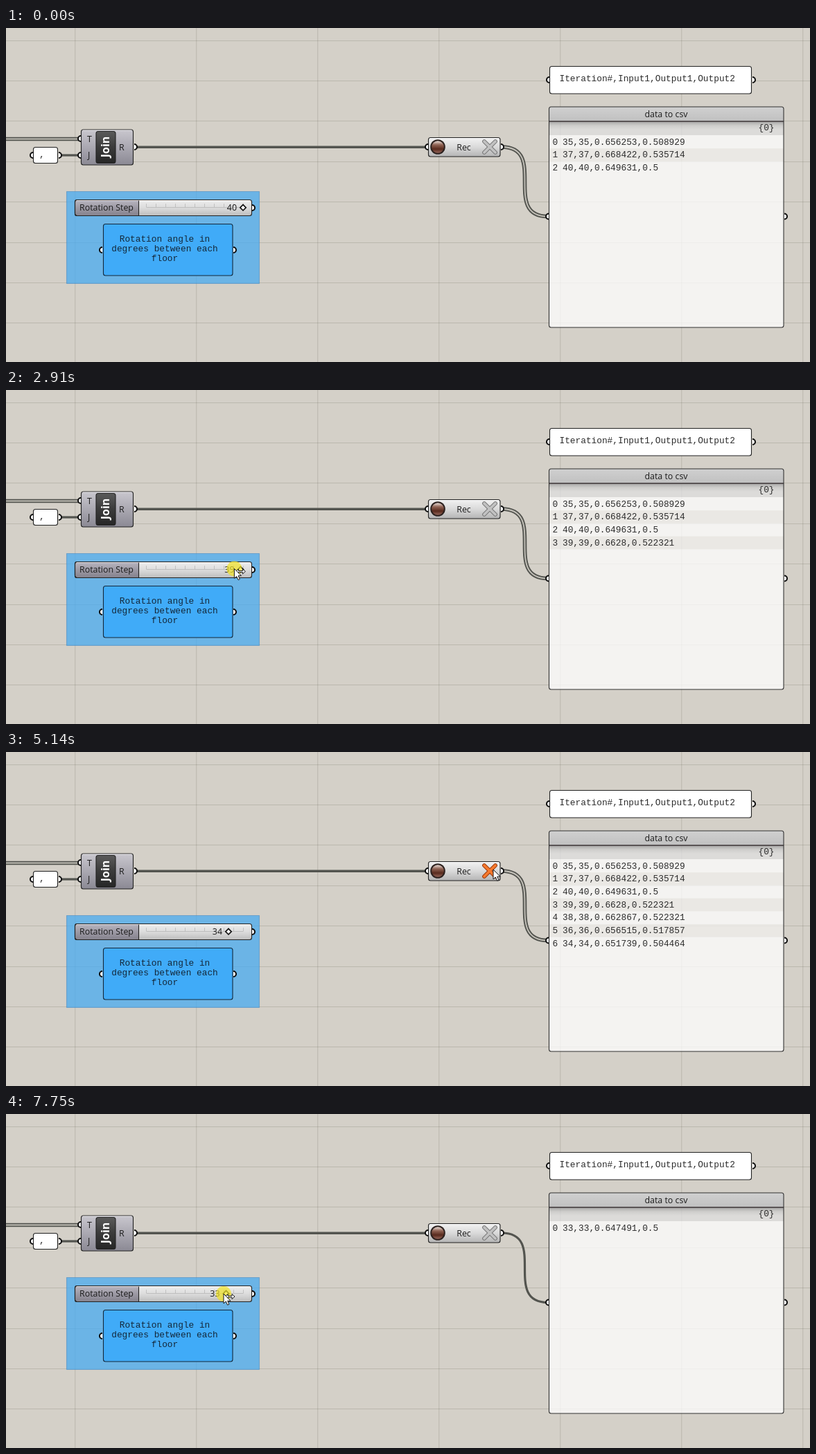
These frames come from a looping animation (1160 by 483 pixels, 8000 ms). An HTML page with a canvas:

```html
<!DOCTYPE html>
<html lang="en">
<head>
<meta charset="utf-8">
<title>Data recorder</title>
<style>
html, body { margin: 0; width: 100%; height: 100%; overflow: hidden; background: #d4d0c8; }
canvas { display: block; width: 1160px; height: 483px; }
</style>
</head>
<body>
<canvas id="stage" width="1160" height="483"></canvas>
<script>
const ctx = document.getElementById('stage').getContext('2d');
const LOOP = 8000;
const CLEAR = 5760;
const UI = '"Open Sans", "Noto Sans", sans-serif';
const MONO = '"Liberation Mono", "Courier New", monospace';
const INK = '#222', WIRE = '#53544f';

// Each line starts with the slider value it was recorded at.
const records = [
  { at: 0, line: '35,35,0.656253,0.508929' },
  { at: 0, line: '37,37,0.668422,0.535714' },
  { at: 0, line: '40,40,0.649631,0.5' },
  { at: 2350, line: '39,39,0.6628,0.522321' },
  { at: 2980, line: '38,38,0.662867,0.522321' },
  { at: 3450, line: '36,36,0.656515,0.517857' },
  { at: 4310, line: '34,34,0.651739,0.504464' },
  { at: 7750, line: '33,33,0.647491,0.5' }
];

const linear = k => k;
const smooth = k => k * k * (3 - 2 * k);
const easeOut = power => k => 1 - (1 - k) ** power;

// The pointer enters, drags the knob, goes to the clear button and returns.
const ENTRY = { x: 375, y: 250 };
const moves = [
  { from: 180, to: 930, x: 341, y: 259, ease: smooth },
  { from: 1950, to: 3650, x: 320.5, y: 258, ease: linear },
  { from: 4310, to: 5100, x: 703, y: 170, ease: smooth },
  { from: 6030, to: 6860, x: 325, y: 260, ease: easeOut(4), easeY: easeOut(1.5) },
  { from: 6930, to: 7600, x: 314, y: 260, ease: linear }
];

function pointerAt(t) {
  if (t < moves[0].from) return null;
  let { x, y } = ENTRY;
  for (const m of moves) {
    const k = Math.min(1, Math.max(0, (t - m.from) / (m.to - m.from)));
    x += (m.x - x) * m.ease(k);
    y += (m.y - y) * (m.easeY || m.ease)(k);
  }
  return { x, y };
}

function stateAt(t) {
  const seen = records.filter(r => r.at <= t);
  return {
    value: parseInt(seen[seen.length - 1].line, 10),
    rows: seen.filter(r => t < CLEAR || r.at > CLEAR).map(r => r.line),
    pressed: (t >= 1350 && t < 4050) || t >= 7400,
    tip: pointerAt(t)
  };
}

function text(s, x, y, font, color, align = 'left') {
  ctx.font = font;
  ctx.fillStyle = color;
  ctx.textAlign = align;
  ctx.fillText(s, x, y);
}
const label = (s, x, y, align) => text(s, x, y, '12.4px ' + UI, '#1a1a1a', align);
const mono = (s, x, y, align, color = '#2c2c2c') => text(s, x, y, '12.8px ' + MONO, color, align);

function shade(y0, y1, ...colors) {
  const g = ctx.createLinearGradient(0, y0, 0, y1);
  colors.forEach((c, i) => g.addColorStop(i / (colors.length - 1), c));
  return g;
}

function rect(x, y, w, h, fill) {
  ctx.fillStyle = fill;
  ctx.fillRect(x, y, w, h);
}

function box(x, y, w, h, fill, stroke = INK, radius = 3) {
  ctx.beginPath();
  ctx.roundRect(x, y, w, h, radius);
  if (fill) { ctx.fillStyle = fill; ctx.fill(); }
  if (stroke) { ctx.strokeStyle = stroke; ctx.lineWidth = 1.1; ctx.stroke(); }
}

function line(x0, y0, x1, y1, color, width = 1) {
  ctx.beginPath();
  ctx.moveTo(x0, y0);
  ctx.lineTo(x1, y1);
  ctx.strokeStyle = color;
  ctx.lineWidth = width;
  ctx.stroke();
}

const gloss = (x, y, w) => line(x + 2, y + 1, x + w - 2, y + 1, 'rgba(255,255,255,0.6)');

function disc(x, y, r, fill) {
  ctx.beginPath();
  ctx.arc(x, y, r, 0, 7);
  ctx.fillStyle = fill;
  ctx.fill();
}

// Half-round sockets on the left and right edges of a node.
function socket(x, y, side) {
  ctx.beginPath();
  ctx.arc(x, y, 4, -Math.PI / 2, Math.PI / 2, side < 0);
  ctx.fillStyle = '#fff';
  ctx.fill();
  ctx.strokeStyle = '#0c0c0c';
  ctx.lineWidth = 2;
  ctx.stroke();
}
function sockets(left, right, y) {
  socket(left, y, -1);
  socket(right, y, 1);
}

function grid() {
  rect(0, 0, 1160, 483, '#d4d0c8');
  const c = 'rgba(60,55,40,0.16)';
  for (let x = 99.75; x < 1160; x += 175) line(x, 0, x, 483, c);
  for (let y = 18; y < 483; y += 58.4) line(0, Math.floor(y) + 0.5, 1160, Math.floor(y) + 0.5, c);
}

function wires(count) {
  line(0, 160.5, 107, 160.5, WIRE, 5.4);
  line(0, 160.5, 107, 160.5, '#c2bfb7', 1.8);
  line(77, 184, 107, 184, WIRE, 3.2);
  line(186, 172.3, 608, 172.3, WIRE, 3.6);
  const curve = (color, width) => {
    ctx.beginPath();
    ctx.moveTo(715, 172);
    ctx.bezierCurveTo(782, 172, 715, 272.5, 782, 272.5);
    ctx.strokeStyle = color;
    ctx.lineWidth = width;
    ctx.stroke();
  };
  curve(count ? WIRE : '#f4683a', count > 1 ? 5.6 : 3.2);
  if (count > 1) curve('#c6c3bb', 1.8);
}

function joinNode() {
  sockets(39, 76, 184);
  box(39.5, 172.5, 35, 23, '#fff');
  mono(',', 48, 187);

  socket(108, 160, -1);
  sockets(108, 185, 184 - 12);
  rect(102, 166.5, 6, 12, '#d4d0c8');
  socket(108, 184, -1);
  box(108.5, 147, 75, 51, shade(147, 198, '#c9c7ce', '#aaa8b1', '#8b8994'));
  gloss(108.5, 147, 75);
  label('T', 117, 164.5);
  label('J', 118, 188);
  label('R', 163, 176.5);
  box(130, 149.5, 28, 46, shade(149, 196, '#5c5c5c', '#3a3a3a', '#262626'));
  ctx.save();
  ctx.translate(149, 172);
  ctx.rotate(-Math.PI / 2);
  text('Join', 0, 0, 'bold 16px ' + UI, '#fff', 'center');
  ctx.restore();
}

function slider(value) {
  box(87.5, 236.5, 278, 133, 'rgba(73,171,240,0.75)', 'rgba(60,130,190,0.5)', 0);

  socket(355, 260, 1);
  box(99.5, 248.5, 255, 23, shade(248, 272, '#efefef', '#dcdcdc', '#bcbcbc'), null);
  box(99.5, 248.5, 92, 23, shade(248, 272, '#bab7c1', '#9d9aa5', '#84818c'), INK, [3, 0, 0, 3]);
  gloss(99.5, 248.5, 255);
  box(99.5, 248.5, 255, 23, null);
  label('Rotation Step', 106, 264);

  const at = v => 202.5 + v * 3.5, tick = 'rgba(110,110,110,0.28)', y = 259.7;
  line(at(0), 259.5, at(40), 259.5, tick);
  for (let v = 0; v <= 40; v += 4) line(at(v), 254, at(v), 259, tick);
  const x = at(value) - 0.5;
  label(String(value), x - 9, 264, 'right');
  ctx.save();
  ctx.translate(x, y);
  ctx.rotate(Math.PI / 4);
  rect(-3.8, -3.8, 7.6, 7.6, '#111');
  rect(-2.1, -2.1, 4.2, 4.2, '#fff');
  ctx.restore();

  sockets(139, 328, 321);
  box(140.5, 283.5, 186.5, 74.5, '#40abf8', '#14283a');
  ['Rotation angle in', 'degrees between each', 'floor'].forEach((s, i) =>
    mono(s, 229, 309.4 + 14 * i, 'center', '#14283a'));
}

function balloon(x, y) {
  box(x, y, 14.5, 10, shade(y, y + 11, '#ffd65c', '#f0a414'), '#b87608', 1);
  ctx.fillStyle = '#d8900e';
  ctx.fill(new Path2D(`M${x + 7} ${y + 10}h5l-3.5 4z`));
}

function cross(x, y, hot) {
  const stroke = (color, width) => [-8, 8].forEach(r => line(x - 8, y - r, x + 8, y + r, color, width));
  ctx.lineCap = 'round';
  stroke(hot ? '#9c3c10' : '#7b7b7b', 5.8);
  stroke(hot ? '#f7792c' : '#c2c2c2', 3.8);
  ctx.lineCap = 'butt';
}

function recorder(empty, hot) {
  sockets(609, 714, 172);
  box(609.5, 158.5, 103.5, 27.5, empty ? shade(158, 186, '#ffb95a', '#ff9a26', '#f08410')
    : shade(158, 186, '#f3f3f3', '#dadada', '#b4b4b4'));
  gloss(609.5, 158.5, 103.5);
  disc(623, 172, 10.8, '#2c211e');
  disc(623, 172, 8.8, empty ? shade(163, 181, '#f0f0f0', '#8a8a8a', '#484645', '#8c8c8c')
    : shade(163, 181, '#efe4df', '#8f6253', '#582a1d', '#96665a'));
  label('Rec', 660.5, 176.5, 'center');
  cross(698, 172, hot);
  if (empty) balloon(696.5, 145.5);
}

function dataPanel(rows) {
  sockets(784, 1077, 75);
  box(784.5, 55.5, 291, 39.5, '#fff');
  mono('Iteration#,Input1,Output1,Output2', 798.5, 77);

  const x = 783.5, w = 338.5, shadow = a => `rgba(60,60,60,${a})`;
  sockets(783, 1123, 272.5);
  box(x, 114, w, 319, 'rgba(255,255,255,0.75)', null);
  if (rows.length) {
    rect(x, 135, w, 20, shadow(0.13));
    mono('{0}', 1085.5, 148);
  } else {
    mono('No data was collected…', 948, 286, 'center', '#adaca9');
  }
  rect(x, 135, w, 12, shade(135, 147, shadow(0.34), shadow(0.09), shadow(0)));
  rows.forEach((s, i) => {
    const y = 168.5 + 18.7 * i;
    if (i % 2) rect(x, y - 13, w, 18.7, 'rgba(110,100,85,0.08)');
    mono(String(i), 788.5, y);
    mono(s, 803, y);
  });

  box(x, 114, w, 21, shade(114, 135, '#d0d0d0', '#c0c0c0'), null, [3, 3, 0, 0]);
  line(x, 135, x + w, 135, '#3c3436', 1.3);
  box(x, 114, w, 319, null, '#333');
  label('data to csv', 952.5, 128.7, 'center');
  if (!rows.length) balloon(1106.5, 101);
}

const arrow = new Path2D('M0 0V14L3.3 11L5.6 16.2L7.9 15.2L5.7 10.2H10Z');
const resize = new Path2D('M2 4L6 .5V3H12V.5L16 4L12 7.5V5H6V7.5Z');

function pointer({ x, y }, pressed) {
  if (pressed) disc(x, y, 11, 'rgba(240,226,40,0.72)');
  ctx.save();
  ctx.translate(x, y);
  ctx.fillStyle = '#fff';
  ctx.strokeStyle = '#181818';
  ctx.lineWidth = 1;
  const overSlider = x < 356 && y > 247;
  for (const shape of overSlider ? [resize, arrow] : [arrow]) {
    ctx.fill(shape);
    ctx.stroke(shape);
  }
  ctx.restore();
}

function draw(t) {
  const { value, rows, pressed, tip } = stateAt(t);
  const hot = tip && Math.abs(tip.x - 698) < 12 && Math.abs(tip.y - 172) < 12;
  grid();
  wires(rows.length);
  joinNode();
  slider(value);
  recorder(!rows.length, hot);
  dataPanel(rows);
  if (tip) pointer(tip, pressed);
}

const start = performance.now();
function tick() {
  draw((performance.now() - start) % LOOP);
  requestAnimationFrame(tick);
}
tick();
</script>
</body>
</html>
```
